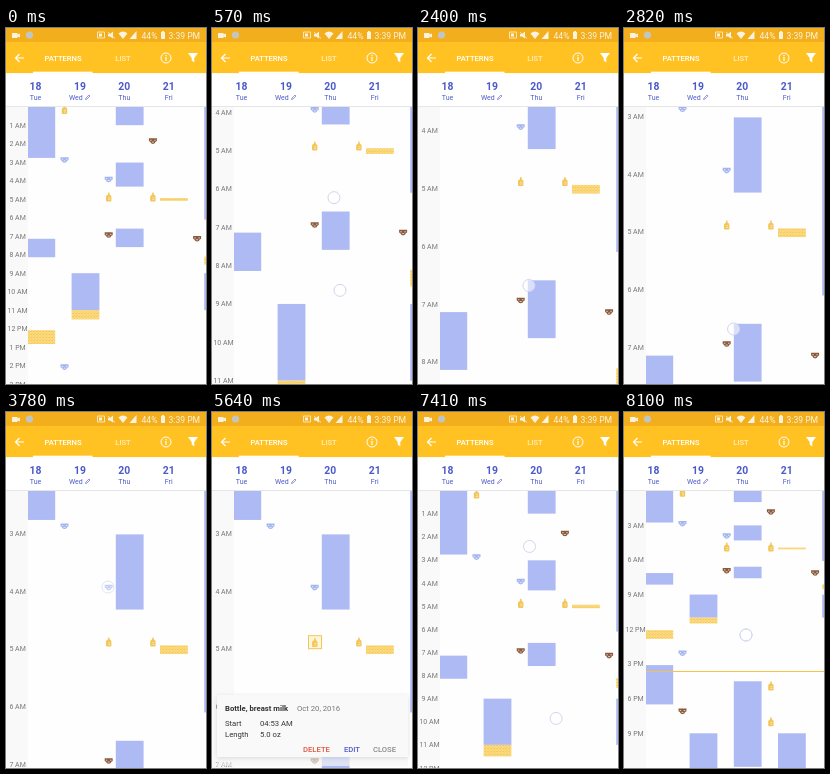
Animation of 200x356 px, one loop 8160 ms. Source, as an HTML page:

```html
<!DOCTYPE html>
<html lang="en">
<head>
<meta charset="utf-8">
<title>Baby day patterns</title>
<style>
html, body { margin: 0; width: 100%; height: 100%; overflow: hidden; background: #fff; }
svg { display: block; width: 100vw; height: 100vh; }
text { font: 7px Roboto, Arial, sans-serif; }
.mid { text-anchor: middle; }
.status text { font-size: 8.6px; }
.tab { font-size: 7.6px; font-weight: 500; }
.num { font-size: 10.4px; font-weight: 700; }
.days { fill: #4c5ac9; }
.hour { fill: #757575; text-anchor: middle; }
.card text { font-size: 7.7px; }
.card .title { font-weight: 700; }
.card .button { font-weight: 500; text-anchor: middle; }
.sleep { fill: #aebaf3; }
.food { fill: url(#dots); }
.bottle { fill: #f3c65a; }
.wet { fill: #a3b5ef; }
.dirty { fill: #8b5a3c; }
.finger { fill: #fff; fill-opacity: .55; stroke: #d2d5ee; }
</style>
</head>
<body>
<svg viewBox="0 0 200 356">
  <defs>
    <clipPath id="body"><rect y="79" width="200" height="277"/></clipPath>
    <pattern id="dots" width="3" height="3" patternUnits="userSpaceOnUse">
      <rect width="3" height="3" fill="#fddb80"/>
      <path d="M0 .5H2M1.500 2H3" stroke="#f4c85c" stroke-width=".9"/>
    </pattern>
    <filter id="shade" x="-10%" y="-20%" width="120%" height="140%">
      <feDropShadow dx="0" dy="1" stdDeviation="2" flood-opacity=".12"/>
    </filter>
    <g id="bottle">
      <path d="M-2.700 3.500V-.5Q-2.500 -1.800 -.8 -2.300L-.5 -4.500H.7L1 -2.300Q2.600 -1.800 2.700 -.5V3.500Q2.700 4.600 1.700 4.600H-1.700Q-2.700 4.600 -2.700 3.500Z"/>
      <path d="M-.5 .8H1.500M-.5 2.600H1.500" stroke="#fff" stroke-width=".8" opacity=".6"/>
    </g>
    <g id="diaper">
      <path d="M-4 -2.800H4V0L2.700 .7Q2.300 2.800 0 2.800T-2.700 .7L-4 0Z"/>
      <path d="M-2.800 -.8H-1.300M1.300 -.8H2.800M-1 1H1" stroke="#fff" opacity=".7"/>
    </g>
  </defs>

  <rect width="200" height="356" fill="#fefefe"/>
  <g clip-path="url(#body)">
    <g id="grid"></g>
    <rect y="79" width="22" height="277" fill="#f9f9f9"/>
    <g id="hours"></g>
    <g id="marks"></g>
  </g>

  <rect width="200" height="45.300" fill="#ffc222"/>
  <rect width="200" height="14" fill="#f2ae1c"/>
  <g class="status" fill="#fff" opacity=".85">
    <path d="M6 5H11.500V6.500L14 5.500V9.500L11.500 8.500V10H6Z"/>
    <circle cx="23.500" cy="7" r="3.600" fill="#b9cbe0"/>
    <path d="M91.500 4H98.500V10H91.500Z" fill="none" stroke="#fff" stroke-width=".8"/>
    <path d="M93 5.500H96V8.500H93Z"/>
    <path d="M102 6H104L107 3.500V10.500L104 8.500H102Z"/>
    <path d="M102 4L109 10.500" stroke="#fff" stroke-width=".8"/>
    <path d="M112.500 5.500Q117 1.500 121.500 5.500L117 11Z"/>
    <path d="M123.500 11L130.500 3V11Z"/>
    <path d="M155 4H156V3H158V4H159V11H155Z"/>
    <text x="135.500" y="10.500">44%</text>
    <text x="162.500" y="10.500">3:39 PM</text>
  </g>
  <g fill="#fff">
    <path d="M18 30H10M13.500 26L9.500 30L13.500 34" fill="none" stroke="#fff" stroke-width="1.200"/>
    <text class="tab mid" x="57" y="32.700">PATTERNS</text>
    <text class="tab mid" x="117" y="32.700" opacity=".7">LIST</text>
    <rect x="27" y="43.700" width="59.500" height="1.600"/>
    <circle cx="160" cy="30" r="5" fill="none" stroke="#fff"/>
    <path d="M159.400 29H160.600V33H159.400ZM159.400 27H160.600V28.200H159.400Z"/>
    <path d="M182 25H192L188.300 30V34.500L185.700 32.500V30Z"/>
  </g>

  <rect y="45.300" width="200" height="33.700" fill="#fff"/>
  <path d="M0 78.500H200" stroke="#e6e6e6"/>
  <g id="days" class="days">
    <path d="M79.500 71.500L80 70L83 67L84 68L81 71Z" fill="none" stroke="#4c5ac9" stroke-width=".6"/>
  </g>

  <g id="chosen">
    <rect x="96.500" y="223.700" width="13" height="13" fill="#fff5d8" stroke="#f3c65a"/>
    <use href="#bottle" class="bottle" x="102.800" y="230.500"/>
  </g>
  <g id="card" class="card" fill="#333">
    <rect x="5" y="344" width="191" height="10" fill="#f6f6f6" opacity=".65"/>
    <rect x="5" y="283" width="191" height="62" rx="1" fill="#f9f9f9" filter="url(#shade)"/>
    <text x="13" y="299" class="title">Bottle, breast milk</text>
    <text x="85" y="299" fill="#777">Oct 20, 2016</text>
    <text x="13" y="314">Start</text><text x="48" y="314">04:53 AM</text>
    <text x="13" y="325">Length</text><text x="48" y="325">5.0 oz</text>
    <text x="104.500" y="340" class="button" fill="#e0533d">DELETE</text>
    <text x="140" y="340" class="button" fill="#4c5ac9">EDIT</text>
    <text x="172.500" y="340" class="button" fill="#8a8a8a">CLOSE</text>
  </g>
  <circle class="finger" r="6"/>
  <circle class="finger" r="6"/>
</svg>
<script>
const LOOP = 8160, STEP = 30;
const GRID_TOP = 78.5;
const FIT = 277.5 / 24;   // pixels per hour with the whole day in view
const CLOSE_UP = 5 * FIT;
const SCROLL = 162;

const $ = id => document.getElementById(id);
const mix = (a, b, k) => a + (b - a) * k;
const ramp = (t, from, to) => Math.min(1, Math.max(0, (t - from) / (to - from)));
const glide = k => 1 - (1 - k) ** 1.4;

function add(parent, tag, attrs, text) {
  const node = document.createElementNS('http://www.w3.org/2000/svg', tag);
  for (const key in attrs) node.setAttribute(key, attrs[key]);
  if (text) node.textContent = text;
  return parent.appendChild(node);
}

// The diary: bars span hours, icons mark single moments
const bars = [], icons = [];
const left = day => 21.4 + 44.2 * day;

function bar(kind, day, from, length) {
  const node = add($('grid'), 'rect', { class: kind, x: left(day), width: 27.8 });
  bars.push({ node, from, length });
}
function icon(shape, kind, day, hour) {
  const node = add($('marks'), 'use', { href: '#' + shape, class: kind });
  icons.push({ node, hour, x: left(day) - 7.1 });
}
const sleep = (day, from, length = 1) => bar('sleep', day, from, length);
const food = (day, from, length) => bar('food', day, from, length);
const bottle = (day, hour) => icon('bottle', 'bottle', day, hour);
const wet = (day, hour) => icon('diaper', 'wet', day, hour);
const dirty = (day, hour) => icon('diaper', 'dirty', day, hour);

[2.77, 0, 1, 0, 6.1].forEach((wake, day) => sleep(day, 0, wake));
for (const day of [1, 3]) sleep(day, 21, 3);
for (const day of [1, 4]) sleep(day, 9, 2);
for (const day of [2, 3]) bottle(day, 4.88);
sleep(0, 7.14);
food(0, 12.08, .75);
sleep(0, 15.1, 3.4);
bottle(1, .15);
wet(1, 2.88);
food(1, 11, .5);
wet(1, 14.08);
dirty(1, 19.1);
sleep(2, 3.02, 1.3);
wet(2, 3.94);
sleep(2, 6.59);
dirty(2, 6.94);
sleep(2, 16.5, 7.4);
dirty(3, 1.86);
food(3, 4.94, .15);
bottle(3, 16.9);
bottle(3, 20);
dirty(4, 7.14);
food(4, 8.11, .43);

const now = add($('grid'), 'rect', { x: 22, width: 178, height: 1, fill: '#f2c24c' });
const hours = Array.from({ length: 23 }, (_, i) => {
  const hour = i + 1;
  const label = `${hour % 12 || 12} ${hour < 12 ? 'AM' : 'PM'}`;
  return { hour, node: add($('hours'), 'text', { class: 'hour', x: 11.6 }, label) };
});
['Tue', 'Wed', 'Thu', 'Fri'].forEach((name, i) => {
  const x = 29.5 + 44.4 * i;
  add($('days'), 'text', { class: 'num mid', x, y: 61.5 }, String(18 + i));
  add($('days'), 'text', { class: 'mid', x: name === 'Wed' ? x - 4 : x, y: 71.5 }, name);
});

// Each gesture maps its progress to touch points
const gestures = [
  { from: 60, to: 1590, touches: k => [[122, 208 - 115 * k], [128, 224 + 115 * k]] },
  { from: 1740, to: 3330, touches: k => [[113 - 5 * k, 172 + SCROLL * glide(k)]] },
  { from: 3740, to: 4140, touches: k => [[102, 175 + 55 * k ** 3]] },
  { from: 5790, to: 5970, touches: () => [[172, 338]] },
  { from: 6750, to: 8100, touches: k => {
    const dx = 2.5 * (1 - k) + 12 * Math.sin(Math.PI * k), dy = 113 * (1 - k * k);
    const x = 127.5 - 5.5 * k, y = 218 + 5 * k;
    return [[x - dx, y - dy], [x + dx, y + dy]];
  } }
];
const FADE = 60;
const fingers = document.querySelectorAll('.finger');

function drawFingers(t) {
  const active = gestures.find(g => t >= g.from && t <= g.to + FADE);
  const points = active ? active.touches(ramp(t, active.from, active.to)) : [];
  fingers.forEach((finger, i) => {
    const point = points[i];
    finger.setAttribute('opacity', point
      ? ramp(t, active.from, active.from + FADE) - ramp(t, active.to, active.to + FADE) : 0);
    if (point) finger.setAttribute('transform', `translate(${point})`);
  });
}

// Pinch out, scroll back, pinch in: each zoom keeps the hour under its focus
function view(t) {
  const zoomedOut = ramp(t, 6870, 7590);
  if (zoomedOut > 0) {
    const scale = mix(CLOSE_UP, FIT, zoomedOut);
    return { scale, top: Math.min(GRID_TOP, 218 - 4.67 * scale) };
  }
  const scale = mix(1.6 * FIT, CLOSE_UP, ramp(t, 315, 820));
  return { scale, top: 216.5 - 7.45 * scale + SCROLL * glide(ramp(t, 1740, 3330)) };
}

function draw(t) {
  const { scale, top } = view(t);
  const y = hour => top + hour * scale;
  for (const { node, from, length } of bars) {
    node.setAttribute('y', y(from));
    node.setAttribute('height', length * scale);
  }
  for (const { node, hour, x } of icons) node.setAttribute('transform', `translate(${x} ${y(hour)})`);
  for (const { node, hour } of hours) {
    node.setAttribute('y', y(hour) + 2.5);
    node.setAttribute('display', scale < 15 && hour % 3 ? 'none' : 'inline');
  }
  now.setAttribute('y', y(15.65) - .5);

  const shown = ramp(t, 4200, 4440) - ramp(t, 6060, 6270);
  $('card').setAttribute('transform', `translate(0 ${40 * (1 - shown)})`);
  $('card').setAttribute('opacity', shown);
  $('chosen').setAttribute('display', shown > 0 ? 'inline' : 'none');
  drawFingers(t);
}

const start = performance.now();
function tick() {
  const t = (performance.now() - start) % LOOP;
  draw(Math.min(Math.floor(t / STEP) * STEP, 8100));
  requestAnimationFrame(tick);
}
tick();
</script>
</body>
</html>
```
